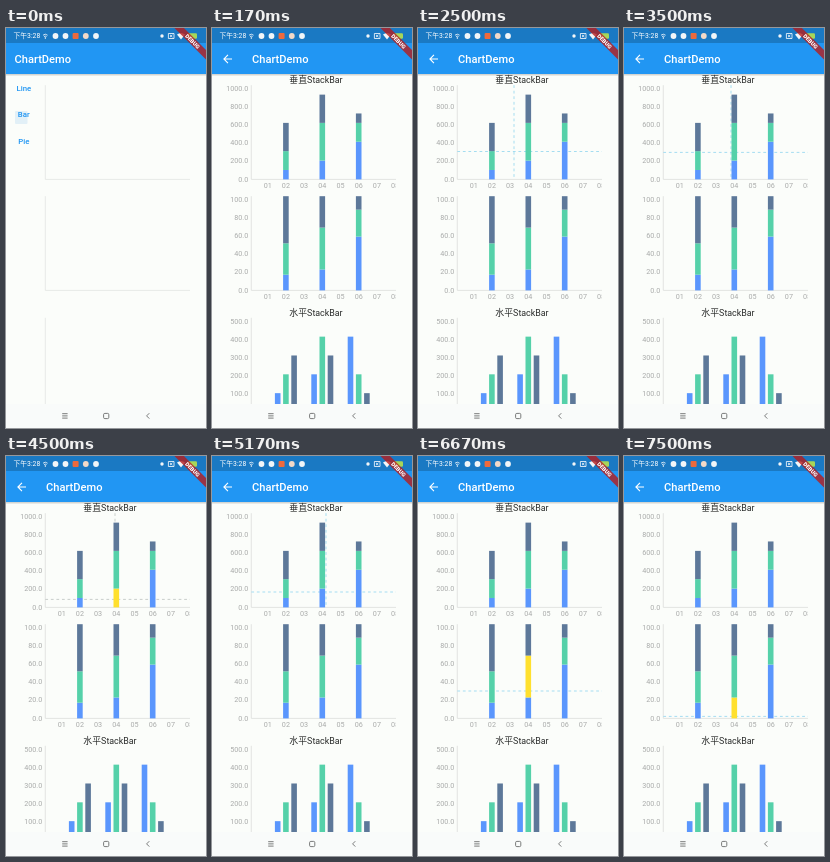
These frames come from a looping animation (200 by 400 pixels, 8 s). An HTML page:

```html
<!DOCTYPE html>
<html lang="zh">
<head>
<meta charset="utf-8">
<title>ChartDemo</title>
<style>
html, body { margin: 0; width: 100%; height: 100%; overflow: hidden; background: #fbfdfa; }
svg { display: block; width: 200px; height: 400px; font-family: Roboto, "Noto Sans CJK SC", "Noto Sans CJK", sans-serif; }
.label { font-size: 7.2px; fill: #a9abaa; }
.heading { font-size: 8.9px; fill: #2a2c2b; text-anchor: middle; }
.menu { font-size: 7.8px; font-weight: 500; fill: #2196f3; text-anchor: middle; }
.title { font-size: 11.1px; font-weight: 500; fill: #fff; }
.axis { stroke: #dcdfdc; stroke-width: .8; fill: none; }
.cross { stroke-width: .9; stroke-dasharray: 2.778; fill: none; }
.line { stroke: #fff; fill: none; }
</style>
</head>
<body>
<svg viewBox="0 0 200 400">
  <defs>
    <clipPath id="body"><rect y="46" width="200" height="330"/></clipPath>
    <clipPath id="plot"><rect width="183.6" height="400"/></clipPath>
    <linearGradient id="shade" x2="0" y2="1">
      <stop stop-color="#000" stop-opacity=".2"/><stop offset="1" stop-color="#000" stop-opacity="0"/>
    </linearGradient>
  </defs>
  <rect width="200" height="400" fill="#fbfdfa"/>
  <g clip-path="url(#body)">
    <g id="home">
      <rect x="9" y="83" width="12.5" height="13" rx="1" fill="#e2f0f7"/>
      <text class="menu" x="17.8" y="62.7">Line</text>
      <text class="menu" x="17.8" y="89.3">Bar</text>
      <text class="menu" x="17.8" y="116">Pie</text>
      <g id="ghost" opacity=".8"></g>
    </g>
    <g id="page"></g>
  </g>
  <rect y="46" width="200" height="2.5" fill="url(#shade)"/>
  <rect width="200" height="46" fill="#2196f3"/>
  <rect width="200" height="15" fill="#1a79c3"/>
  <text x="7.5" y="10.3" font-size="6.8" fill="#fff">下午3:28</text>
  <path class="line" stroke-width=".8" d="M37 7.2q2.3-2 4.6 0M38 8.6q1.3-1 2.6 0M39.3 9v2"/>
  <g fill="#f2f6f8">
    <circle cx="49.5" cy="8" r="2.9"/><circle cx="59.5" cy="8" r="2.9"/>
    <rect x="66.6" y="5" width="6" height="6" rx="1" fill="#ee6a3c"/>
    <circle cx="79.8" cy="8" r="2.9" fill="#f3d9c8"/><circle cx="90" cy="8" r="2.9"/>
    <circle cx="156" cy="8" r="1.7"/>
    <path d="M171 6.6q4-3.2 8 0l-4 4.8z"/>
    <rect x="181.5" y="5.2" width="9.5" height="5.6" rx="1.2" fill="#a6d65a"/>
  </g>
  <path class="line" stroke-width=".8" d="M162.4 5.5h5.6v5h-5.6zM164 6.9l2.4 2.2m0-2.2l-2.4 2.2"/>
  <path id="back" fill="#fff" transform="translate(8.9 24.3) scale(.556)"
    d="M20 11H7.83l5.59-5.59L12 4l-8 8 8 8 1.41-1.41L7.83 13H20z"/>
  <text id="title" class="title" y="34.9">ChartDemo</text>
  <g transform="translate(200 0) rotate(45)">
    <rect x="-22.3" y="15.6" width="44.6" height="6.7" fill="#b71c1c" fill-opacity=".8"/>
    <text y="21" font-size="5.6" font-weight="900" fill="#fff" text-anchor="middle">DEBUG</text>
  </g>
  <rect y="376" width="200" height="24" fill="#f9fbfa"/>
  <g fill="none" stroke="#6b6d6c" stroke-width=".9">
    <path d="M56.2 385.7h5.4m-5.4 2.2h5.4m-5.4 2.2h5.4"/>
    <rect x="97.6" y="385.4" width="5.2" height="5.2" rx="1.2"/>
    <path d="M143.3 385.2l-2.7 2.7 2.7 2.7"/>
  </g>
</svg>
<script>
const LOOP = 8000, OPEN = 170;
const LEFT = 39.3, RIGHT = 184, STEP = 18.2, HEIGHT = 94.2, BAR_W = 5.6;
const COLORS = ['#5a96fd', '#55d1a9', '#5d7899'], HIT = '#ffe02e';
const SKY = '#9bdaf0', MIST = '#b0cfda', GREY = '#c3c9c6';
const DATA = { 2: [100, 200, 300], 4: [200, 400, 300], 6: [400, 200, 100] };
const BASES = [151.4, 262.4, 384];

// Each step: start time, chart (-1 hides the crosshair), x, y, colour
const STEPS = [
  [0, -1], [1670, 0, 75, 117.7, MIST], [1830, 0, 75, 122, MIST],
  [2170, 0, 80, 122.5, SKY], [2330, 0, 88, 123, SKY], [2500, 0, 96, 123.5, SKY], [2670, 0, 102, 124, SKY],
  [3330, 0, 105, 124.3, SKY], [3500, 0, 107, 124.4, SKY],
  [4170, 0, 108, 130, GREY], [4330, 0, 109, 137, GREY], [4500, 0, 109, 143.4, GREY],
  [5000, 0, 111, 140, GREY], [5170, 0, 114, 136, SKY], [5330, 0, 115, 134, SKY],
  [5670, -1], [5830, 1, 113.4, 220.5, SKY],
  [6330, 1, 113, 225, SKY], [6500, 1, 112.5, 230, SKY], [6670, 1, 112, 235, SKY], [6830, 1, 112, 239, SKY],
  [7330, 1, 111, 250, SKY], [7500, 1, 110, 260.4, SKY]
];

const $ = id => document.getElementById(id);
const text = (cls, x, y, s, anchor = 'middle') =>
  `<text class="${cls}" x="${x}" y="${y}" text-anchor="${anchor}">${s}</text>`;
const path = (cls, d, extra = '') => `<path class="${cls}" d="${d}" ${extra}/>`;
const slot = n => 37.5 + n * STEP;

const axes = BASES.map(b => path('axis', `M${LEFT} ${b - HEIGHT}V${b}H${RIGHT}`)).join('');

function yLabels(base, top, count) {
  let out = '';
  for (let i = 0; i <= count; i++)
    out += text('label', 36.3, base + 2.1 - 90.3 * i / count, (top * i / count).toFixed(1), 'end');
  return out;
}

function xLabels(base) {
  let out = '';
  for (let n = 1; n <= 8; n++) out += text('label', slot(n), base + 8.7, '0' + n);
  return `<g clip-path="url(#plot)">${out}</g>`;
}

// Bars of all three charts as plain rectangles
const bars = [];
for (const [n, values] of Object.entries(DATA)) {
  const total = values.reduce((a, b) => a + b);
  [1000, total].forEach((max, chart) => {
    let y = BASES[chart];
    values.forEach((v, i) => {
      const h = v / max * HEIGHT;
      y -= h;
      bars.push({ chart, x: slot(+n) - BAR_W / 2, y, h, color: COLORS[i] });
    });
  });
  values.forEach((v, i) => {
    const h = v / 500 * HEIGHT;
    bars.push({ chart: 2, x: slot(+n) - BAR_W / 2 + (i - 1) * 8.2, y: BASES[2] - h, h, color: COLORS[i] });
  });
}

const labels = text('heading', 104, 55.2, '垂直StackBar') + text('heading', 104, 288.2, '水平StackBar') +
  yLabels(151.4, 1000, 5) + yLabels(262.4, 100, 5) + yLabels(384, 500, 5) +
  xLabels(151.4) + xLabels(262.4);

$('ghost').innerHTML = axes;
$('page').innerHTML = axes + labels + '<g id="cross"></g>' +
  bars.map(b => `<rect class="bar" x="${b.x}" y="${b.y}" width="${BAR_W}" height="${b.h}"/>`).join('');
const rects = document.querySelectorAll('.bar');

function crosshair(chart, x, y, color) {
  if (chart < 0) return '';
  const base = BASES[chart];
  return path('cross', `M${LEFT} ${y}H${RIGHT}`, `stroke="${color}"`) +
    path('cross', `M${x} ${base - HEIGHT}V${base}`, `stroke="${color}"`);
}

function render(t) {
  const open = t >= OPEN;
  $('home').style.display = open ? 'none' : '';
  $('page').style.display = $('back').style.display = open ? '' : 'none';
  $('title').setAttribute('x', open ? 40 : 8.6);

  const [, chart, x, y, color] = STEPS.filter(s => s[0] <= t).pop();
  $('cross').innerHTML = crosshair(chart, x, y, color);
  bars.forEach((b, i) => {
    const hit = b.chart === chart && x > b.x && x < b.x + BAR_W && y > b.y && y < b.y + b.h;
    rects[i].setAttribute('fill', hit ? HIT : b.color);
  });
}

const start = performance.now();
function tick() {
  render((performance.now() - start) % LOOP);
  requestAnimationFrame(tick);
}
tick();
</script>
</body>
</html>
```
